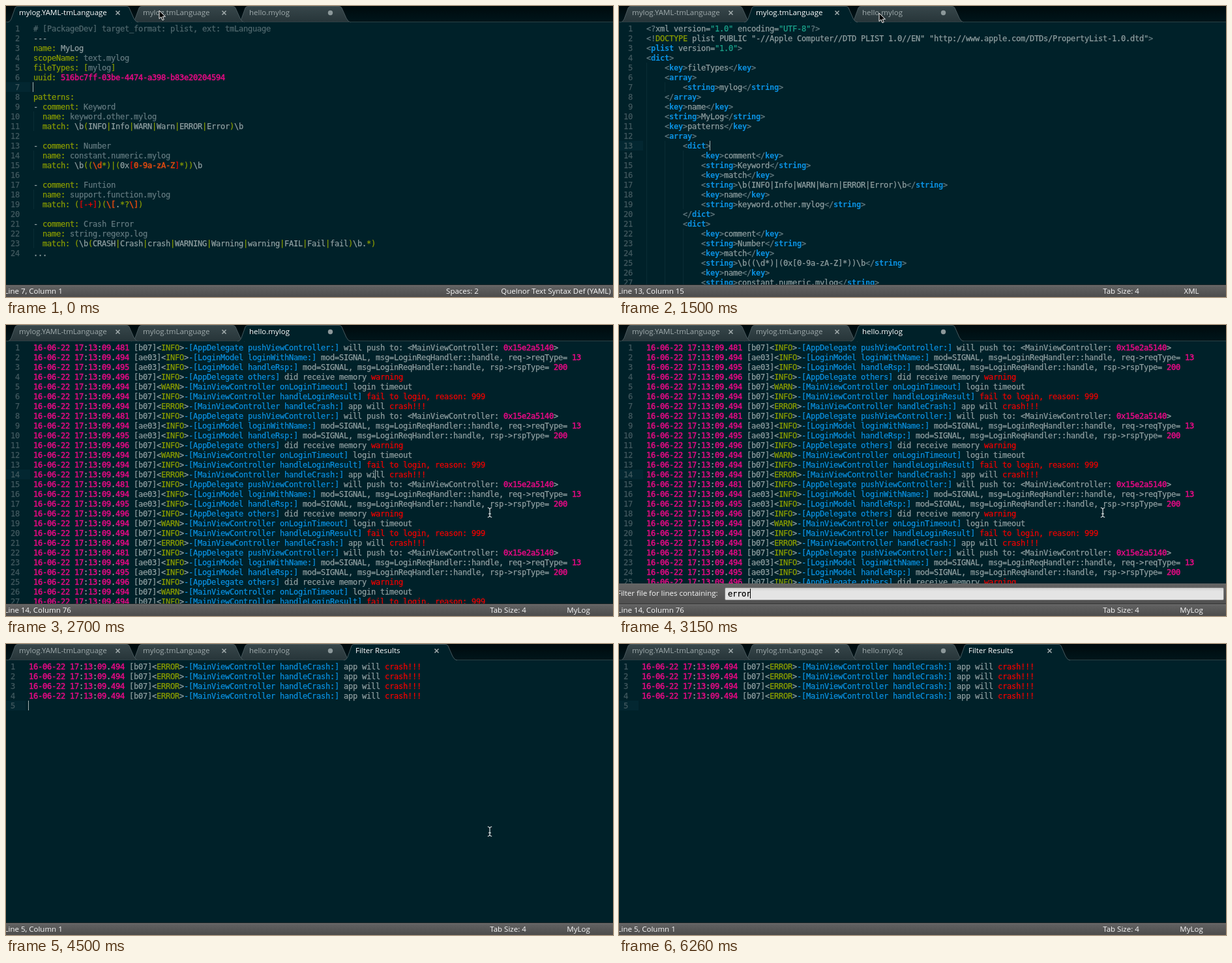
An HTML page for the animation above (6360 ms loop, 931 by 447 pixels).

```html
<!DOCTYPE html>
<html lang="en">
<head>
<meta charset="utf-8">
<title>Log syntax and filter</title>
<style>
  :root { --bg: #002129; --fg: #8f9ea0; --gap: 0px; --loop: 6360ms step-end infinite; }
  html, body { margin: 0; width: 100%; height: 100%; overflow: hidden; background: var(--bg); }
  #stage { position: relative; width: 931px; height: 447px; overflow: hidden; }
  .scene, .scene > svg { position: absolute; left: 0; top: 0; width: 931px; height: 447px; }
  .scene { background: var(--bg); }
  .ui { font: 11.5px "Open Sans", "Noto Sans", sans-serif; fill: #f8f8f8; }
  .mono { font: 12px/15px "DejaVu Sans Mono", monospace; letter-spacing: var(--gap); white-space: pre; -webkit-text-stroke: .25px; }
  .code { position: absolute; left: 0; top: 28px; width: 931px; height: 400px; overflow: hidden; color: var(--fg); }
  .line { position: relative; height: 15px; padding-left: var(--x); }
  .num { position: absolute; left: 0; top: 0; width: calc(var(--x) - 21px); height: 15px; text-align: right; color: #42595f; }
  .here::before { content: ""; position: absolute; left: 0; top: -1px; width: calc(var(--x) - 5px); height: 15px; background: #032731; }
  .guide { position: absolute; left: var(--x); top: -1px; height: 15px;
    background: repeating-linear-gradient(90deg, #0a2c35 0 1px, transparent 1px var(--tab)); }
  b { font-weight: 400; }
  .pink { color: #e30a83; -webkit-text-stroke: .5px; }
  .tag { color: #0a90e0; font-weight: 700; -webkit-text-stroke: 0; }
  .blue { color: #0a90e0; }
  .green { color: #8a9d00; }
  .red { color: #f00000; }
  .orange { color: #e04a10; -webkit-text-stroke: .5px; }
  .teal { color: #1ba38c; }
  .muted { color: #62797f; }
  .dim { color: #50686e; }

  .caret { position: absolute; width: 1px; height: 15px; background: #a4b0b0; animation: blink var(--loop); }
  #yaml { animation: yaml var(--loop); }
  #xml { animation: xml var(--loop); }
  #log { animation: log var(--loop); }
  #found { animation: found var(--loop); }
  #log .focus { animation: focus var(--loop); }
  #panel { position: absolute; left: 0; top: 397px; width: 931px; height: 31px;
    background: linear-gradient(#646464, #4f4f4f); animation: panel var(--loop); }
  #panel svg { position: absolute; left: 0; top: 0; }
  #field { position: absolute; left: 162px; top: 6px; width: 764px; height: 18px;
    border: 1px solid #7c7c7c; border-radius: 2px; background: linear-gradient(#d2d2d2, #e4e4e4 5px); color: #000; }
  #field span { position: absolute; left: 4px; top: 2px; }
  #field .caret { left: 38px; top: 1px; background: #000; }
  #arrow, #beam { position: absolute; left: 0; top: 0; }
  #arrow { animation: arrow var(--loop); }
  #beam { animation: beam var(--loop); }

  @keyframes yaml { 0% { visibility: visible } 4.716%, to { visibility: hidden } }
  @keyframes xml { 0% { visibility: hidden } 4.716% { visibility: visible } 25.943%, to { visibility: hidden } }
  @keyframes log { 0% { visibility: hidden } 25.943% { visibility: visible } 70.754%, to { visibility: hidden } }
  @keyframes found { 0% { visibility: hidden } 70.754%, to { visibility: visible } }
  @keyframes panel { 0% { visibility: hidden } 49.528% { visibility: visible } 70.754%, to { visibility: hidden } }
  @keyframes focus { 0% { opacity: 1 } 49.528%, to { opacity: 0 } }
  @keyframes blink {
    0%, 4.716%, 23.584%, 42.452%, 66.037%, 87.264% { opacity: 1 }
    2.358%, 11.792%, 21.226%, 33.018%, 54.245%, 75.471% { opacity: .5 }
    14.15%, 35.377%, 56.603%, 77.83%, 94.182%, to { opacity: 0 }
  }
  @keyframes arrow {
    0% { transform: translate(234px, 6px); opacity: 1 }
    11.792% { transform: translate(303px, 7px); opacity: 1 }
    14.15% { transform: translate(363px, 7px); opacity: 1 }
    16.509% { transform: translate(386px, 10px); opacity: 1 }
    18.867% { transform: translate(398px, 10px); opacity: 1 }
    30.66%, to { transform: translate(398px, 10px); opacity: 0 }
  }
  @keyframes beam {
    0% { transform: translate(723px, 272px); opacity: 0 }
    30.66% { transform: translate(723px, 272px); opacity: 1 }
    33.018% { transform: translate(738px, 280px); opacity: 1 }
    82.547%, to { transform: translate(738px, 280px); opacity: 0 }
  }
</style>
</head>
<body>
<div id="stage">
  <svg width="0" height="0" style="position:absolute">
    <defs>
      <linearGradient id="bar" x2="0" y2="1"><stop stop-color="#000a0d"/><stop offset="1" stop-color="#00161b"/></linearGradient>
      <linearGradient id="idle" x2="0" y2="1"><stop stop-color="#37464a"/><stop offset="1" stop-color="#273539"/></linearGradient>
      <linearGradient id="foot" x2="0" y2="1"><stop stop-color="#646464"/><stop offset="1" stop-color="#4c4c4c"/></linearGradient>
    </defs>
  </svg>
</div>
<script>
const stage = document.getElementById('stage');
const esc = s => s.replace(/[&<>]/g, c => `&#${c.charCodeAt(0)};`);

// Colours the parts of a line; the first rule that matches wins.
function paint(text, rules) {
  const re = new RegExp(rules.map(r => `(${r[0].source})`).join('|'), 'g');
  let out = '', at = 0;
  for (const m of text.matchAll(re)) {
    const i = m.slice(1).findIndex(g => g !== undefined);
    out += esc(text.slice(at, m.index)) + `<b class="${rules[i][1]}">${esc(m[0])}</b>`;
    at = m.index + m[0].length;
  }
  return out + esc(text.slice(at));
}

const yamlRules = [
  [/^#.*/, 'dim'],
  [/(?<=comment: |  name: |scopeName: ).+/, 'muted'],
  [/[\da-f]{8}-.+/, 'pink'],
  [/\b[a-zA-Z]+:/, 'green'],
  [/(?<=\[)mylog/, 'muted'],
  [/\\[d[\]]/, 'orange'],
  [/0-9a-zA-Z/, 'orange'],
  [/\[-\+\]|\[(?=0)|\](?=\*)/, 'red'],
  [/[()|*?]|\[(?=m)|\]$/, 'green'],
];
const xmlRules = [
  [/(?<=<\/?)(?:plist|dict|key|array|string)\b/, 'tag'],
  [/DOCTYPE/, 'green'],
  [/"(?:1\.0|UTF-8)"/, 'teal'],
  [/<[/?!]?|\??>/, 'muted'],
];
const logRules = [
  [/-\[.*?\]/, 'blue'],
  [/\b(?:INFO|WARN|ERROR)\b/, 'green'],
  [/\b(?:warning|fail|crash)\b.*/, 'red'],
  [/\d\d-\d\d-\d\d/, 'pink'],
  [/\b(?:0x[\da-f]+|\d+)\b/, 'pink'],
];

const yaml = String.raw`# [PackageDev] target_format: plist, ext: tmLanguage
---
name: MyLog
scopeName: text.mylog
fileTypes: [mylog]
uuid: 516bc7ff-03be-4474-a398-b83e20204594

patterns:
- comment: Keyword
  name: keyword.other.mylog
  match: \b(INFO|Info|WARN|Warn|ERROR|Error)\b

- comment: Number
  name: constant.numeric.mylog
  match: \b((\d*)|(0x[0-9a-zA-Z]*))\b

- comment: Funtion
  name: support.function.mylog
  match: ([-+])(\[.*?\])

- comment: Crash Error
  name: string.regexp.log
  match: (\b(CRASH|Crash|crash|WARNING|Warning|warning|FAIL|Fail|fail)\b.*)
...`.split('\n');

const xml = String.raw`<?xml version="1.0" encoding="UTF-8"?>
<!DOCTYPE plist PUBLIC "-//Apple Computer//DTD PLIST 1.0//EN" "http://www.apple.com/DTDs/PropertyList-1.0.dtd">
<plist version="1.0">
<dict>
    <key>fileTypes</key>
    <array>
        <string>mylog</string>
    </array>
    <key>name</key>
    <string>MyLog</string>
    <key>patterns</key>
    <array>
        <dict>
            <key>comment</key>
            <string>Keyword</string>
            <key>match</key>
            <string>\b(INFO|Info|WARN|Warn|ERROR|Error)\b</string>
            <key>name</key>
            <string>keyword.other.mylog</string>
        </dict>
        <dict>
            <key>comment</key>
            <string>Number</string>
            <key>match</key>
            <string>\b((\d*)|(0x[0-9a-zA-Z]*))\b</string>
            <key>name</key>
            <string>constant.numeric.mylog</string>`.split('\n');

const events = [
  '481 [b07]<INFO>-[AppDelegate pushViewController:] will push to: <MainViewController: 0x15e2a5140>',
  '494 [ae03]<INFO>-[LoginModel loginWithName:] mod=SIGNAL, msg=LoginReqHandler::handle, req->reqType= 13',
  '495 [ae03]<INFO>-[LoginModel handleRsp:] mod=SIGNAL, msg=LoginReqHandler::handle, rsp->rspType= 200',
  '496 [b07]<INFO>-[AppDelegate others] did receive memory warning',
  '494 [b07]<WARN>-[MainViewController onLoginTimeout] login timeout',
  '494 [b07]<INFO>-[MainViewController handleLoginResult] fail to login, reason: 999',
  '494 [b07]<ERROR>-[MainViewController handleCrash:] app will crash!!!',
].map(s => '16-06-22 17:13:09.' + s);
const log = Array.from({ length: 27 }, (_, i) => events[i % 7]);
const found = [...Array(4).fill(events[6]), ''];

const tabs = [
  { name: 'mylog.YAML-tmLanguage', x: 5, text: 20 },
  { name: 'mylog.tmLanguage', x: 195, text: 210 },
  { name: 'hello.mylog', x: 358, text: 373, dirty: true },
  { name: 'Filter Results', x: 521, text: 536 },
];

function tab(i, active) {
  const { name, x, text, dirty } = tabs[i];
  const r = 187 + 163 * i, mid = r - 15.5;
  const shape = `M${x - 3} 25Q${x + 1} 25 ${x + 3} 20L${x + 9} 3Q${x + 10} .5 ${x + 13} .5H${r - 2}` +
    `Q${r + 1} .5 ${r + 2} 3L${r + 9} 19Q${r + 12} 25 ${r + 16} 25`;
  const mark = dirty
    ? `<circle cx="${mid}" cy="10.5" r="3.7" fill="#8c989a"/>`
    : `<path d="M${mid - 3} 7.5l6 6m0-6l-6 6" stroke="#a3adae" stroke-width="1.5"/>`;
  return `<path d="${shape}" fill="${active ? '#002129' : 'url(#idle)'}" stroke="${active ? '#46585d' : '#4a595d'}"/>
    ${mark}<text x="${text}" y="14" fill="${active ? '#fff' : '#9ea9ab'}">${name}</text>`;
}

function chrome(count, active, position, indent, syntax) {
  let idle = '';
  for (let i = count - 1; i >= 0; i--) if (i !== active) idle += tab(i, false);
  const [ix, ilabel] = indent, [sx, slabel] = syntax;
  return `<svg class="ui" viewBox="0 0 931 447">
    <rect width="931" height="25" fill="url(#bar)"/>${idle}
    <path d="M0 24.5H931" stroke="#2c3f44"/>${tab(active, true)}
    <rect y="428" width="931" height="19" fill="url(#foot)"/>
    <path d="M0 428.5H931" stroke="#333"/><path d="M0 429.5H931" stroke="#727272"/>
    <text x="-2.5" y="442">${position}</text>
    <text x="${ix}" y="442" text-anchor="middle">${ilabel}</text>
    <text x="${sx}" y="442" text-anchor="middle">${slabel}</text></svg>`;
}

function scene(id, { lines, rules, row, col, size = 4, count = 3, active, indent = [770, 'Tab Size: 4'], syntax }) {
  const left = lines.length > 9 ? 42 : 35;
  const rows = lines.map((s, i) => {
    const pad = s.search(/\S|$/);
    const guide = pad ? `<i class="guide" style="width:${pad * 7}px"></i>` : '';
    return `<div class="line${i + 1 === row ? ' here' : ''}"><span class="num">${i + 1}</span>${guide}${paint(s, rules)}</div>`;
  }).join('');
  const caret = `left:${left + (col - 1) * 7 - 1}px;top:${(row - 1) * 15 - 1}px`;
  stage.insertAdjacentHTML('beforeend', `<div class="scene" id="${id}">
    <div class="code mono" style="--x:${left}px;--tab:${size * 7}px">${rows}<div class="focus"><i class="caret" style="${caret}"></i></div></div>
    ${chrome(count, active, `Line ${row}, Column ${col}`, indent, syntax)}</div>`);
}

scene('yaml', { lines: yaml, rules: yamlRules, row: 7, col: 1, size: 2, active: 0,
  indent: [700, 'Spaces: 2'], syntax: [843.5, 'Quelnor Text Syntax Def (YAML)'] });
scene('xml', { lines: xml, rules: xmlRules, row: 13, col: 15, active: 1, syntax: [878, 'XML'] });
scene('log', { lines: log, rules: logRules, row: 14, col: 76, active: 2, syntax: [878, 'MyLog'] });
scene('found', { lines: found, rules: logRules, row: 5, col: 1, count: 4, active: 3, syntax: [878, 'MyLog'] });

stage.insertAdjacentHTML('beforeend', `
  <div id="panel">
    <svg class="ui" width="162" height="31"><text x="-3" y="19">Filter file for lines containing:</text></svg>
    <div id="field" class="mono"><span>error</span><i class="caret"></i></div>
  </div>
  <svg id="arrow" width="12" height="18"><path d="M1 1V13.5L4 10.8L6 15.8L8.2 14.8L6.2 10.2H10.4Z" fill="#000" stroke="#fff"/></svg>
  <svg id="beam" width="8" height="16"><path d="M.8 .7Q4 .7 4 3V13Q4 15.3 .8 15.3M7.2 .7Q4 .7 4 3M4 13Q4 15.3 7.2 15.3M2 10H6" fill="none" stroke="#fff"/></svg>`);

// Put the monospaced text on a 7 px grid.
const probe = document.createElement('span');
probe.className = 'mono';
probe.style.position = 'absolute';
probe.textContent = '0'.repeat(100);
stage.append(probe);
const advance = probe.getBoundingClientRect().width / 100;
probe.remove();
document.documentElement.style.setProperty('--gap', (7 - advance).toFixed(4) + 'px');
</script>
</body>
</html>
```
